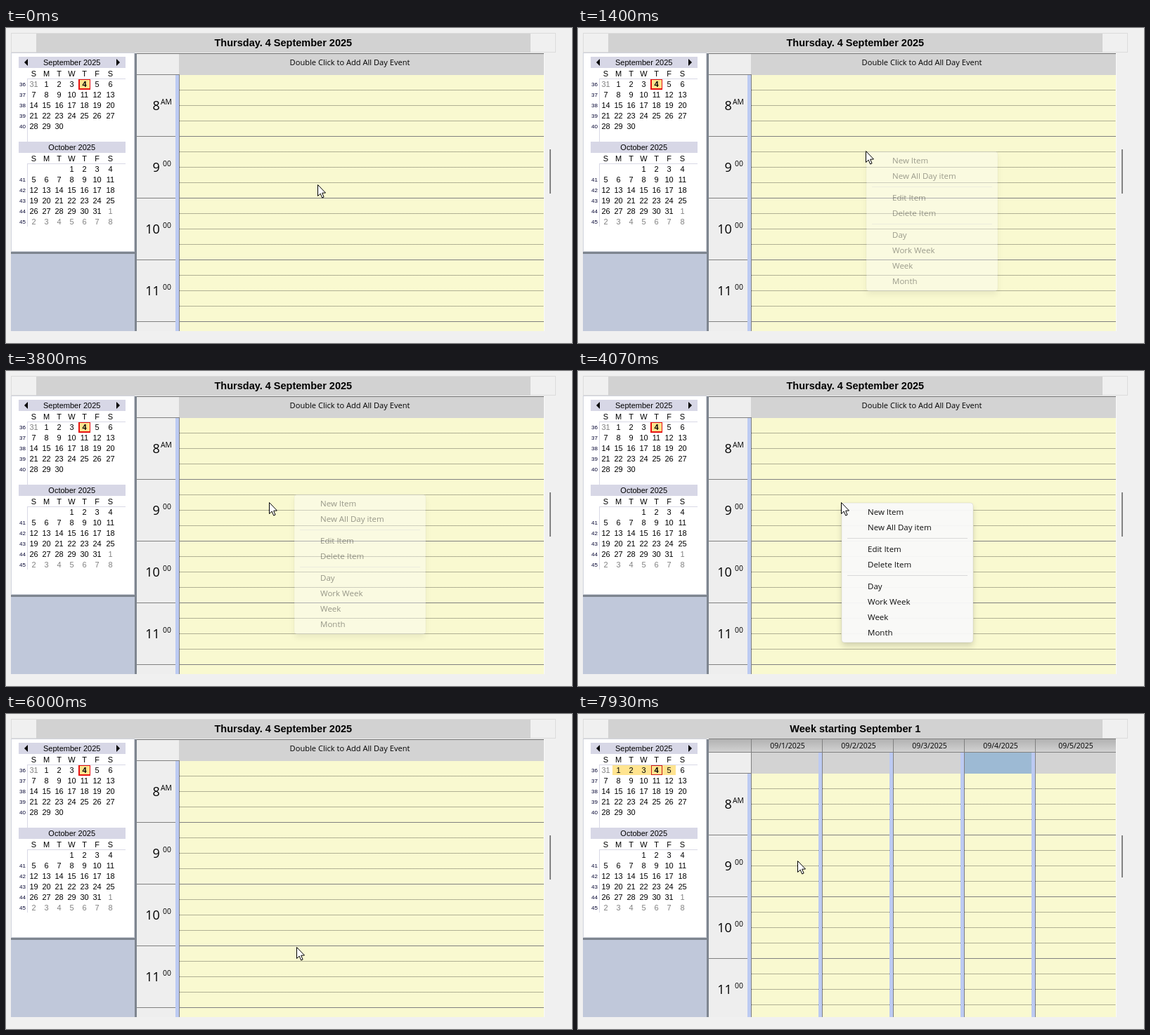
Recreate the animation shown at these times as an HTML page with a canvas. Size 805 by 449 pixels, loop 8000 ms.

```html
<!DOCTYPE html>
<html lang="en">
<head>
<meta charset="utf-8">
<title>Calendar view switch</title>
<style>
html, body { margin: 0; width: 100%; height: 100%; overflow: hidden; background: #f0f0f0; }
canvas { display: block; }
</style>
</head>
<body>
<canvas id="stage" width="805" height="449"></canvas>
<script>
const ctx = document.getElementById('stage').getContext('2d');
const LOOP = 8000;
const UI = '"Open Sans", "Noto Sans", sans-serif';
const ARIAL = '"Liberation Sans", Arial, sans-serif';
const LINE = '#808080', PAPER = '#f9f9d0', STRIP = '#bccaf2', BAND = '#d3d3d3', CELL = '#eeeeee';
const BOTTOM = 432, RIGHT = 765, GRID = 247;

const WEEK_AT = 6200, SIDEBAR_AT = 6270;
const CURSOR = [
  [0, 443, 223], [330, 409, 175], [2730, 409, 175], [2800, 403, 175], [3070, 389, 182],
  [3200, 389, 182], [3400, 374, 187], [4670, 374, 187], [5000, 378, 240], [5270, 398, 290],
  [5530, 413, 332], [6470, 413, 332], [6730, 321, 129], [6930, 314, 96], [7270, 323, 79],
  [7330, 323, 79], [7600, 307, 132], [7930, 312, 209]
];
const MENUS = [
  { x: 410, y: 176, fade: [[1330, 0], [1400, .38], [1470, .92], [1530, 1], [3730, 1], [3800, .4], [3870, 0]] },
  { x: 375, y: 188, fade: [[3930, 0], [4000, .38], [4070, .95], [4130, 1], [5670, 1], [5730, 0]] }
];
const PICKED_FADE = [[5670, 0], [5730, .83], [6000, 0]];
const ITEMS = [
  ['New Item', 13], ['New All Day item', 35], ['Edit Item', 66], ['Delete Item', 88],
  ['Day', 119], ['Work Week', 141], ['Week', 163], ['Month', 185]
];
const PICKED = ITEMS[5];

function track(keys, t) {
  if (t <= keys[0][0]) return keys[0].slice(1);
  for (let i = 1; i < keys.length; i++) {
    const a = keys[i - 1], b = keys[i];
    if (t <= b[0]) {
      const p = (t - a[0]) / (b[0] - a[0]);
      return a.slice(1).map((v, j) => v + (b[j + 1] - v) * p);
    }
  }
  return keys[keys.length - 1].slice(1);
}

function rect(x0, y0, x1, y1, color) {
  ctx.fillStyle = color;
  ctx.fillRect(x0, y0, x1 - x0, y1 - y0);
}

function text(str, x, y, font, align = 'center', color = '#000') {
  ctx.font = font;
  ctx.textAlign = align;
  ctx.fillStyle = color;
  ctx.fillText(str, x, y);
}

function shape(points, color) {
  ctx.beginPath();
  points.forEach(([x, y]) => ctx.lineTo(x, y));
  ctx.closePath();
  ctx.fillStyle = color;
  ctx.fill();
}

function rounded(x, y, w, h, r, color) {
  ctx.beginPath();
  ctx.roundRect(x, y, w, h, r);
  ctx.fillStyle = color;
  ctx.fill();
}

function dotted(x0, x1, y) {
  ctx.strokeStyle = '#686858';
  ctx.lineWidth = 1;
  ctx.setLineDash([1, 1]);
  ctx.beginPath();
  ctx.moveTo(x0, y + .5);
  ctx.lineTo(x1, y + .5);
  ctx.stroke();
  ctx.setLineDash([]);
}

function titleBar(str) {
  rect(7, 7, 782, 35, '#dcdcdc');
  rect(8, 8, 781, 34, '#f0f0f0');
  rect(43, 8, 746, 35, '#d2d2d2');
  text(str, 394.3, 26, 'bold 14.5px ' + ARIAL);
}

const dayX = col => col === 6 ? 148.5 : 39.5 + 18 * col;

function month(name, top, first, length, previous, firstWeek, rows) {
  const font = '11px ' + ARIAL, rule = '#d8d8e6';
  rect(18, top, 170, top + 16, '#d7d7e6');
  text(name, 93.7, top + 12, font);
  [...'SMTWTFS'].forEach((d, i) => text(d, dayX(i), top + 28, font));
  rect(30, top + 31, 170, top + 32, rule);
  rect(30, top + 31, 31, top + 121, rule);
  for (let row = 0; row < rows; row++) {
    const y = top + 43 + row * 15;
    // The first October row shares its week with the last September one.
    const week = firstWeek + row;
    if (week !== 40 || first === 1) text(week, 23.5, y - 1, '8px ' + ARIAL, 'center', '#000030');
    for (let col = 0; col < 7; col++) {
      const n = row * 7 + col - first + 1;
      if (n < 1) {
        if (previous) text(previous + n, dayX(col), y, font, 'center', LINE);
      } else if (n <= length) {
        const today = first === 1 && n === 4;
        text(n, dayX(col), y, (today ? 'bold ' : '') + font);
      } else if (first === 3) {
        text(n - length, dayX(col), y, font, 'center', LINE);
      }
    }
  }
}

function sidebar(weekMode) {
  rect(7, 35, 183, 319, '#d0d3dc');
  rect(8, 36, 182, 318, '#fff');
  rect(7, 322, 183, BOTTOM, '#c0c8da');
  rect(7, 319, 183, 322, '#7e858f');
  rect(183, 36, 186, BOTTOM, '#7e858f');
  if (weekMode) {
    rect(49, 73, 139, 87, '#ffe490');
    rect(104, 73, 120, 87, '#d01818');
  } else {
    rect(103, 72, 120, 88, '#e81010');
  }
  rect(105, 74, 119, 86, '#fbe48e');
  month('September 2025', 41, 1, 30, 31, 36, 5);
  month('October 2025', 162, 3, 31, 0, 40, 6);
  shape([[26, 49], [31, 44], [31, 54]], '#000');
  shape([[162, 49], [157, 44], [157, 54]], '#000');
}

function timeColumn(top) {
  rect(186, top + 1, 241, BOTTOM, CELL);
  rect(241, top + 1, 246, BOTTOM, STRIP);
  rect(186, top, 246, top + 1, LINE);
  for (let i = 0; i < 4; i++) {
    const mid = top + 44 + i * 88;
    text(8 + i, 218.8, mid + 7, '500 18px ' + UI, 'right');
    text(i ? '00' : 'AM', i ? 223 : 220, mid - 1, '10.4px ' + UI, 'left');
    if (mid + 44 < BOTTOM) rect(186, mid + 44, 241, mid + 45, LINE);
  }
  rect(246, top, 247, BOTTOM, LINE);
}

function slots(x0, x1, top) {
  rect(x0, top + 1, x1, BOTTOM, PAPER);
  for (let i = 1, y = top + 22; y < BOTTOM; i++, y += 22) {
    if (i % 4) dotted(x0, x1, y);
    else rect(x0, y, x1, y + 1, LINE);
  }
}

function dayView() {
  rect(186, 36, RIGHT, 37, '#707070');
  rect(186, 37, 246, 66, CELL);
  rect(246, 37, RIGHT, 67, BAND);
  text('Double Click to Add All Day Event', 489, 53, '11.1px ' + UI);
  timeColumn(66);
  slots(GRID, RIGHT, 66);
}

function weekView() {
  const shade = ctx.createLinearGradient(0, 36, 0, 54);
  shade.addColorStop(0, '#b2b2b2');
  shade.addColorStop(1, '#d2d2d2');
  rect(186, 36, RIGHT, 54, shade);
  rect(186, 35, RIGHT, 36, LINE);
  rect(186, 54, RIGHT, 55, LINE);
  rect(186, 55, 246, 84, CELL);
  timeColumn(84);
  rect(246, 36, 247, 84, LINE);
  for (let i = 0; i < 5; i++) {
    const x = GRID + i * 101, last = i === 4;
    const end = last ? RIGHT : x + 95;
    rect(x, 55, end, 85, i === 3 ? '#9dbad4' : BAND);
    slots(x, end, 84);
    if (!last) {
      rect(end, 55, end + 5, BOTTOM, STRIP);
      rect(end + 5, 36, end + 6, BOTTOM, LINE);
    }
    text(`09/${i + 1}/2025`, last ? 708 : x + 51, 49, '10.5px ' + UI);
  }
}

function menuItem([label, offset], menu, hot) {
  if (hot) rounded(menu.x + 5, menu.y + offset - 11, 177, 22, 4, '#f0f0f0');
  text(label, menu.x + 37, menu.y + offset + 4, '11.5px ' + UI, 'left');
}

function drawMenu({ x, y }, alpha, mx, my) {
  ctx.save();
  ctx.globalAlpha = alpha;

  // Keep the shadow outside the body so that a half-faded menu stays light.
  ctx.save();
  ctx.beginPath();
  ctx.rect(0, 0, 805, 449);
  ctx.roundRect(x, y, 187, 199, 4);
  ctx.clip('evenodd');
  ctx.shadowColor = 'rgba(0,0,0,.16)';
  ctx.shadowBlur = 9;
  ctx.shadowOffsetY = 5;
  rounded(x, y, 187, 199, 4, '#e2e2da');
  ctx.restore();

  rounded(x, y, 187, 199, 4, '#f9f9f9');
  ctx.strokeStyle = 'rgba(0,0,0,.08)';
  ctx.lineWidth = 1;
  ctx.stroke();
  for (const line of [50, 103]) rect(x + 8, y + line, x + 179, y + line + 1, '#d7d7d7');
  for (const item of ITEMS) {
    const hot = mx >= x + 5 && mx < x + 182 && Math.abs(my - y - item[1]) < 11;
    menuItem(item, { x, y }, hot);
  }
  ctx.restore();
}

function drawCursor(x, y) {
  ctx.save();
  ctx.translate(Math.round(x) + .5, Math.round(y) + .5);
  shape([[0, 0], [0, 16], [3.7, 12.6], [6.2, 18.5], [8.6, 17.5], [6.2, 11.7], [11, 11.5]], '#fff');
  ctx.strokeStyle = '#000';
  ctx.lineWidth = 1;
  ctx.stroke();
  ctx.restore();
}

function draw(t) {
  const week = t >= WEEK_AT, settled = t >= SIDEBAR_AT;
  const [mx, my] = track(CURSOR, t);
  rect(0, 0, 805, 449, '#f0f0f0');
  titleBar(week ? 'Week starting September 1' : 'Thursday. 4 September 2025');
  sidebar(settled);
  if (week) weekView();
  else dayView();
  rect(RIGHT, 36, RIGHT + 1, BOTTOM, '#fafafa');
  rect(773, 173, 775, settled ? 233 : 236, '#838383');

  for (const menu of MENUS) {
    const [alpha] = track(menu.fade, t);
    if (alpha > 0) drawMenu(menu, alpha, mx, my);
  }
  const [picked] = track(PICKED_FADE, t);
  if (picked > 0) {
    ctx.globalAlpha = picked;
    menuItem(PICKED, MENUS[1], true);
    ctx.globalAlpha = 1;
  }
  drawCursor(mx, my);
}

// Motion advances 15 steps a second, rounded to 10 ms.
function tick() {
  const step = Math.floor((performance.now() % LOOP + 3.4) * 15 / 1000);
  draw(Math.round(step * 20 / 3) * 10 % LOOP);
  requestAnimationFrame(tick);
}
tick();
</script>
</body>
</html>
```
